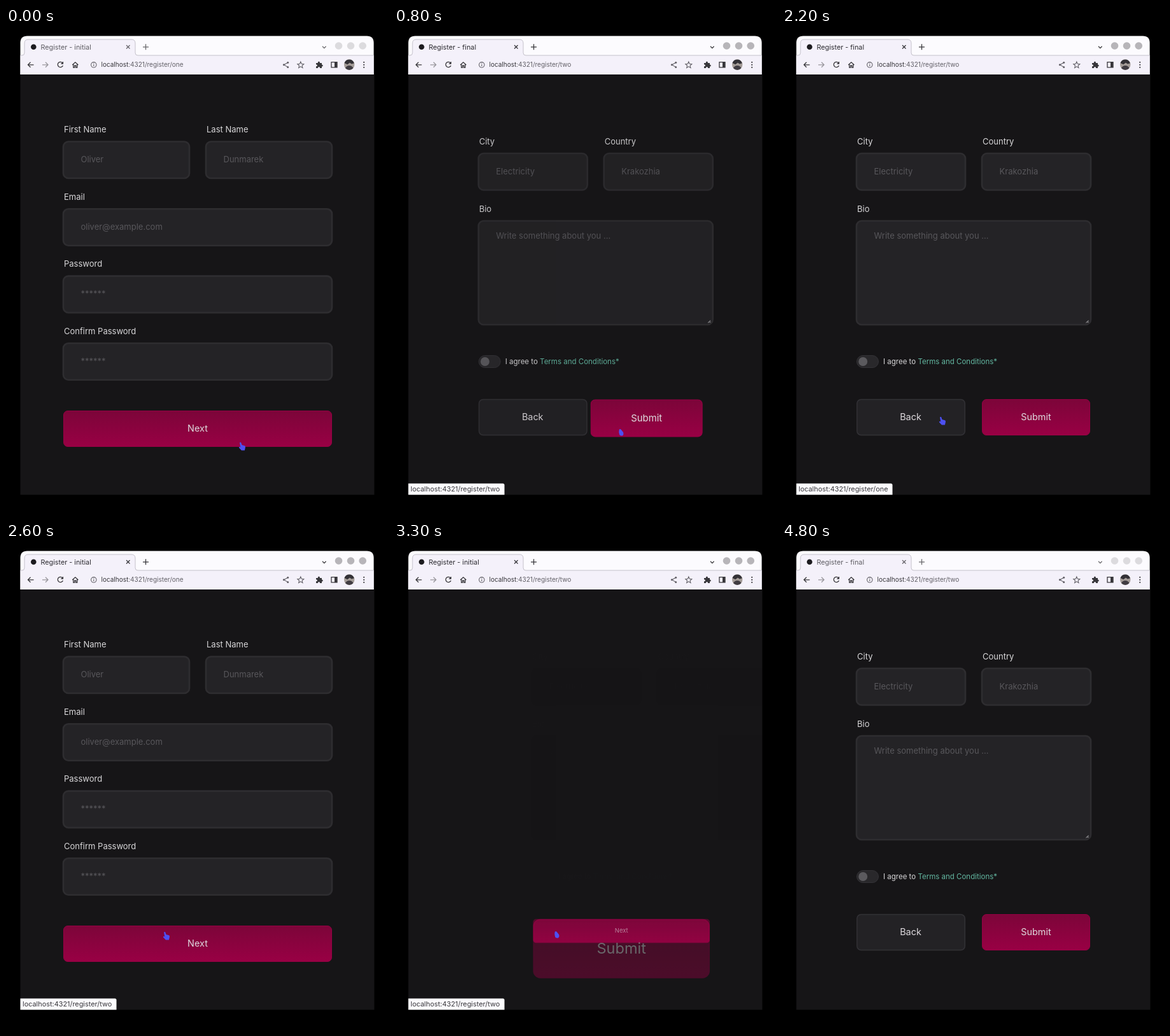
Write an HTML page that moves like this. It is 600 px wide and 765 px high and loops after 4900 ms.

```html
<!DOCTYPE html>
<html lang="en">
<head>
<meta charset="utf-8">
<title>Register</title>
<style>
  html, body { margin: 0; width: 100%; height: 100%; overflow: hidden; background: #000; }
  svg { display: block; width: 600px; height: 765px; font-family: Inter, Roboto, sans-serif; }
  .label { font-size: 13px; fill: #d8d7d9; }
  .hint { font-size: 13px; fill: #58575b; }
  .action { font-size: 14.4px; fill: #dedade; text-anchor: middle; }
  .icon { fill: none; stroke: #38373b; stroke-width: 1.3; }
  .morph { isolation: isolate; }
  .morph > g { mix-blend-mode: plus-lighter; }
</style>
</head>
<body>
<svg id="stage" viewBox="0 0 600 765" xmlns="http://www.w3.org/2000/svg"></svg>
<script>
const LOOP = 4900;
const NEXT = { x: 90, y: 601, w: 422 };
const SUBMIT = { x: 314, y: 583, w: 170 };
const BUTTON_H = 57;

// Page changes: start time and direction (1 = forward, -1 = back)
const TRANSITIONS = [
  { start: 600, dir: 1 },
  { start: 2250, dir: -1 },
  { start: 3218, dir: 1 },
];

const label = (x, y, s) => `<text class="label" x="${x}" y="${y}">${s}</text>`;
const hint = (x, y, s) => `<text class="hint" x="${x}" y="${y}">${s}</text>`;
const box = (x, y, w, h) =>
  `<rect x="${x}" y="${y}" width="${w}" height="${h}" rx="8" fill="#242326" stroke="#2e2d30" stroke-width="2.6"/>`;
const field = (x, y, w, name, value) =>
  label(x + 1, y - 14.5, name) + box(x, y, w, 57.5) + hint(x + 27.5, y + 32.7, value);
const primary = (id, w, s) => `<g id="${id}">
  <rect x=".5" y=".5" width="${w - 1}" height="${BUTTON_H - 1}" rx="6.5" fill="url(#wine)" stroke="#960044"/>
  <text class="action" x="${w / 2}" y="33">${s}</text></g>`;

const tabStrip = `
  <path d="M22.500 73V23.500q0-11 11-11H566.600q11 0 11 11V73z" fill="#fcfbfe"/>
  <path d="M22.500 43H25q4 0 4-4V24q0-6 6-6h162q6 0 6 6v15q0 4 4 4H577.600V73H22.500z" fill="#f4f1fa"/>
  <path d="M22.500 43H25q4 0 4-4V24q0-6 6-6h162q6 0 6 6v15q0 4 4 4H577.600" fill="none" stroke="#c4c1cb"/>
  <circle cx="43.3" cy="29.7" r="4.3" fill="#1c1b1f"/>
  <g id="tabText">
    <text id="title" x="54.5" y="33.6" font-size="10.8" fill="#2c2b30"></text>
    <path class="icon" d="M189 27l5.5 5.5m0-5.5l-5.5 5.5M215 29.8h9m-4.5-4.5v9M497 28.8l2.8 2.8 2.8-2.8"/>
  </g>
  <g id="controls" fill="#b7b5b9">
    ${[522.5, 541.5, 560.2].map(x => `<circle cx="${x}" cy="28" r="5.8"/>`).join('')}
  </g>`;

const toolbar = `
  <g class="icon">
    <path d="M43.5 57.8H34.5m4-4l-4 4 4 4"/>
    <path d="M57 57.8h9m-4-4l4 4-4 4" stroke="#98969c"/>
    <path d="M89 55.2a4.2 4.2 0 1 0 .4 3.8M89.4 53v3h-3"/>
    <path d="M104.2 58l4.6-4.2 4.6 4.2M105.8 57v5h2v-3h2v3h2v-5"/>
    <g stroke="#626067" stroke-width="1.1">
      <circle cx="137.8" cy="57.8" r="4.2"/><path d="M137.8 57v3m0-5v1"/>
      <path d="M442.5 54.4l-6 3.4 6 3.6"/>
      <path d="M462.8 53l1.4 3.3 3.6.3-2.7 2.4.8 3.5-3.1-1.9-3.1 1.9.8-3.5-2.7-2.4 3.6-.3z"/>
    </g>
    <path d="M511 53.7h9v8.2h-9z"/>
  </g>
  <g fill="#626067"><circle cx="442.7" cy="54.3" r="1.5"/><circle cx="436.4" cy="57.8" r="1.5"/><circle cx="442.7" cy="61.5" r="1.5"/></g>
  <path d="M487 55h2.8q-.2-2.5 1.6-2.5t1.6 2.5H496v2.6q1.8 0 1.8 1.5T496 60.6V63h-2.8q-.2-2-1.7-2t-1.7 2H487v-2.8q2 0 2-1.5t-2-1.5z" fill="#38373b"/>
  <path d="M516 54h4v8h-4z" fill="#38373b"/>
  <circle cx="539.2" cy="57.8" r="8.2" fill="#a49c98"/>
  <path d="M531.5 55q2-5.4 7.7-5.4t7.7 5.6l-4 1.4-3-2-3.6 2.6z" fill="#333136"/>
  <path d="M533 63q2-4 6.2-4t6.2 4q-2.500 3-6.2 3t-6.2-3z" fill="#403c42"/>
  <g fill="#38373b">${[53.8, 57.8, 61.8].map(y => `<circle cx="562.2" cy="${y}" r="1.1"/>`).join('')}</g>
  <text x="149.5" y="61.400" font-size="10" fill="#626067"><tspan fill="#36353a">localhost</tspan>:4321/register/<tspan id="url"></tspan></text>`;

const pageOne = `<g id="pageOne">
  ${field(90, 178.500, 198, 'First Name', 'Oliver')}
  ${field(314, 178.500, 198, 'Last Name', 'Dunmarek')}
  ${field(90, 284.200, 422, 'Email', 'oliver@example.com')}
  ${field(90, 389.600, 422, 'Password', '******')}
  ${field(90, 495.200, 422, 'Confirm Password', '******')}
</g>`;

const pageTwo = `<g id="pageTwo">
  ${field(117, 197, 171, 'City', 'Electricity')}
  ${field(314, 197, 171, 'Country', 'Krakozhia')}
  ${label(118, 288.500, 'Bio')}${box(117, 303, 368, 163)}${hint(144.500, 330.600, 'Write something about you ...')}
  <path d="M477.500 463l4-3.500m-1.500 3.500l1.500-1.500" stroke="#c8c7ca" fill="none"/>
  <rect x="117.500" y="514.500" width="34" height="19" rx="9.500" fill="#29282b" stroke="#343337"/>
  <circle cx="127.200" cy="524" r="7" fill="#5b5a5e"/>
  <text x="159" y="527.900" font-size="11.5" fill="#d8d7d9">I agree to <tspan fill="#63b7a1">Terms and Conditions*</tspan></text>
  <rect x="117.800" y="583.500" width="169.500" height="56" rx="6.500" fill="#232225" stroke="#323135" stroke-width="1.5"/>
  <text class="action" x="202" y="615.500">Back</text>
</g>`;

const stage = document.getElementById('stage');
stage.innerHTML = `
  <defs>
    <linearGradient id="wine" x2="0" y2="1"><stop stop-color="#7c0539"/><stop offset="1" stop-color="#990044"/></linearGradient>
    <clipPath id="view"><path d="M22.500 73H578.500V733.300H22.500z"/></clipPath>
  </defs>
  <rect width="600" height="765"/>
  ${tabStrip}${toolbar}
  <g clip-path="url(#view)">
    <path d="M22 73H579V734H22z" fill="#161517"/>
    ${pageOne}${pageTwo}
    <g class="morph">${primary('next', NEXT.w, 'Next')}${primary('submit', SUBMIT.w, 'Submit')}</g>
    <g id="status">
      <path d="M22 715.500H171q2.500 0 2.500 2.500V734H22z" fill="#fcfbfe"/>
      <text x="26" y="728.300" font-size="10.9" fill="#38373b">localhost:4321/register/<tspan id="statusPage"></tspan></text>
    </g>
  </g>
  <g id="cursor" fill="#4d50f2">
    <path id="hand" d="M-4-5.500q1.200-1.400 2.300 0l1.200 3.500 4.500 1.200q1.300.800.900 2.800l-1 4.500h-5l-3.800-4q-.700-1.800 1-1.700l1.200.600z"/>
    <path id="press" d="M.800-6.500q1.600-1.200 3 .400l3.200 4q1.400 3.900-1.200 5.500-3 .800-4.600-1.500-1.600-4.500-.4-8.400z"/>
  </g>`;

const el = {};
stage.querySelectorAll('[id]').forEach(node => { el[node.id] = node; });

const clamp = v => Math.min(1, Math.max(0, v));
const ramp = (t, from, to) => clamp((t - from) / (to - from));
const mix = (a, b, p) => a + (b - a) * p;

function bezier(x1, y1, x2, y2) {
  const at = (a, b, u) => 3 * a * u * (1 - u) ** 2 + 3 * b * u * u * (1 - u) + u ** 3;
  return x => {
    let lo = 0, hi = 1;
    for (let i = 0; i < 24; i++) {
      const mid = (lo + hi) / 2;
      if (at(x1, x2, mid) < x) lo = mid; else hi = mid;
    }
    return at(y1, y2, (lo + hi) / 2);
  };
}
const ease = bezier(.25, .1, .25, 1);
const swing = bezier(.76, 0, .24, 1);

function place(node, x, y, scale, opacity) {
  node.setAttribute('transform', `translate(${x} ${y}) scale(${scale})`);
  node.setAttribute('opacity', opacity);
}

function drawPages(t) {
  const current = TRANSITIONS.filter(c => c.start <= t).pop() || { start: -LOOP, dir: -1 };
  const { dir } = current;
  const forward = dir > 0;
  const age = t - current.start;
  const [oldPage, newPage] = forward ? [el.pageOne, el.pageTwo] : [el.pageTwo, el.pageOne];

  place(oldPage, -100 * dir * swing(ramp(age, 0, 220)), 0, 1, 1 - swing(ramp(age, 0, 85)));
  place(newPage, 100 * dir * (1 - swing(ramp(age, 60, 284))), 0, 1, swing(ramp(age, 60, 260)));

  // The main button morphs between its two layouts while crossfading
  const directed = p => forward ? p : 1 - p;
  const q = directed(ease(ramp(age, 0, 250)));
  const fade = directed(ramp(age, 0, 200));
  const x = mix(NEXT.x, SUBMIT.x, q), y = mix(NEXT.y, SUBMIT.y, q), w = mix(NEXT.w, SUBMIT.w, q);
  place(el.next, x, y, w / NEXT.w, 1 - fade);
  place(el.submit, x, y, w / SUBMIT.w, fade);

  el.url.textContent = forward ? 'two' : 'one';
  el.title.textContent = 'Register - ' + (forward === age >= 90 ? 'final' : 'initial');
  return age < 270;
}

function drawCursor(t, pressed) {
  const toNext = ease(ramp(t, 50, 500)), toBack = ease(ramp(t, 1550, 2100));
  const x = mix(mix(371, 353, toNext), 252, toBack);
  const y = mix(mix(657, 637, toNext), 617, toBack);
  place(el.cursor, x, y, 1, t < 3950 ? 1 : 0);
  el.hand.setAttribute('opacity', pressed ? 0 : 1);
  el.press.setAttribute('opacity', pressed ? 1 : 0);
}

function drawStatus(t) {
  const shown = t < 1400
    ? ramp(t, 200, 350) - ramp(t, 900, 1050)
    : ramp(t, 1800, 1950) - ramp(t, 4050, 4250);
  el.status.setAttribute('opacity', shown);
  el.statusPage.textContent = t < 1400 || (t >= 2600 && t < 3600) ? 'two' : 'one';
}

function draw(t) {
  const focus = ramp(t, 50, 250) - ramp(t, 4600, 4800);
  el.tabText.setAttribute('opacity', mix(.75, 1, focus));
  el.controls.setAttribute('opacity', mix(.45, 1, focus));
  drawCursor(t, drawPages(t));
  drawStatus(t);
}

const begin = performance.now();
function tick() {
  draw((performance.now() - begin) % LOOP);
  requestAnimationFrame(tick);
}
tick();
</script>
</body>
</html>
```
